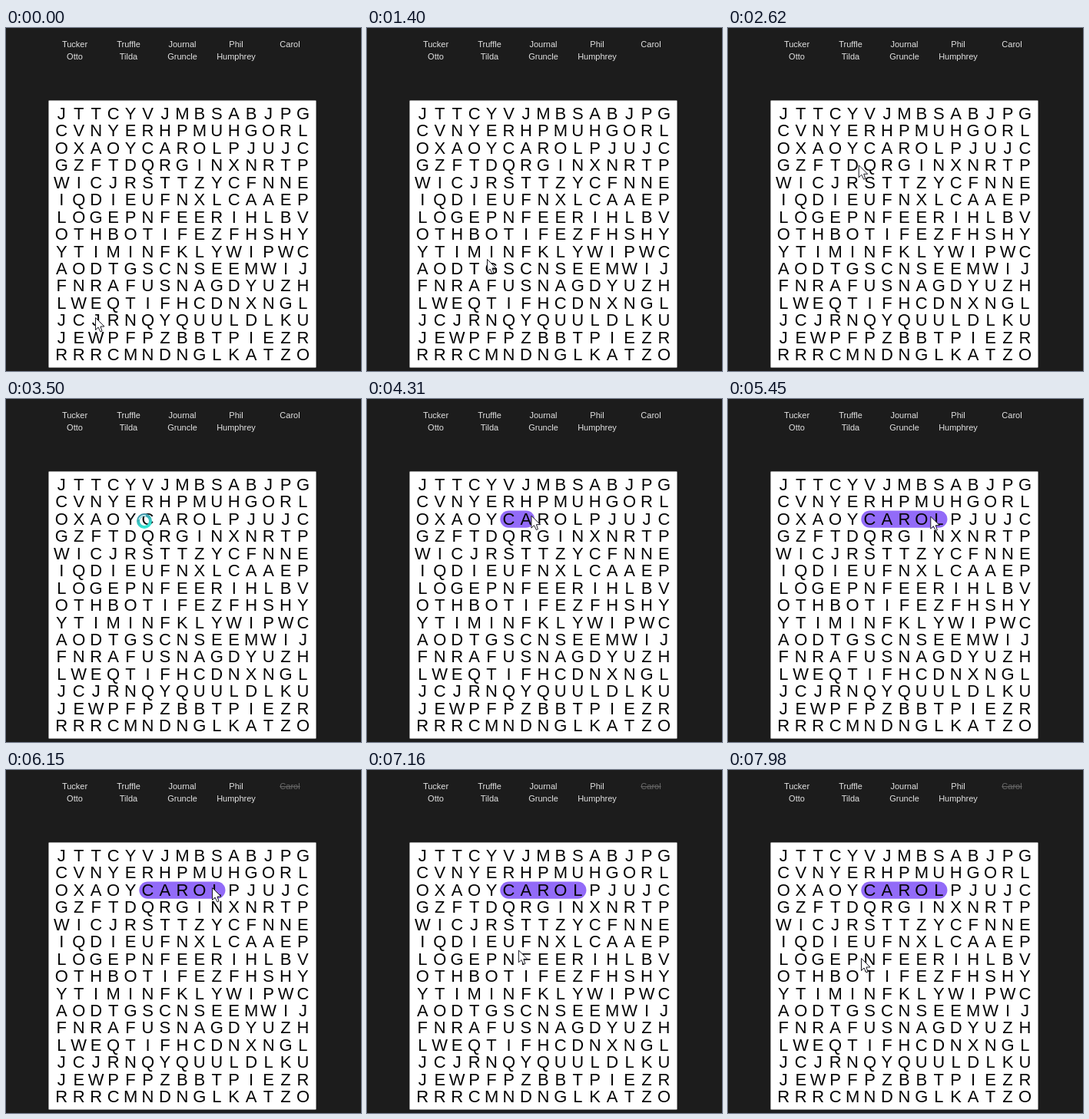
Animation, 462 px wide and 447 px high, one loop 8 s. Source, as an HTML page:

```html
<!DOCTYPE html>
<html lang="en">
<head>
<meta charset="utf-8">
<title>Word search</title>
<style>
  html, body { margin: 0; width: 100%; height: 100%; overflow: hidden; background: #1c1c1c; }
  svg { display: block; width: 462px; height: 447px; }
  text { font-family: "Liberation Sans", Arial, sans-serif; text-anchor: middle; }
  #words { font-size: 11px; fill: #e2e2e2; }
  #words .found { fill: #686868; text-decoration: line-through; }
  #letters { font-size: 22px; fill: #050505; }
</style>
</head>
<body>
<svg viewBox="0 0 462 447">
  <defs>
    <linearGradient id="teal" x1="0" y1="0" x2="0.3" y2="1">
      <stop offset="0" stop-color="#3f8fa6"/>
      <stop offset="1" stop-color="#35e3d2"/>
    </linearGradient>
  </defs>
  <g id="words"></g>
  <rect x="55.5" y="94.5" width="348" height="348" rx="1" fill="#fff" stroke="#999"/>
  <rect id="pill" fill="#926bf8"/>
  <g id="letters"></g>
  <g id="ring" fill="none">
    <circle cx="180" cy="159" r="8" stroke="url(#teal)" stroke-width="4"/>
    <path d="M173 157a7.5 7.5 0 0 1 9-5" stroke="#d5f4f5" stroke-width="1.5"/>
  </g>
  <path id="arrow" d="M.5 .5V16.5L4 13L7 19L9 18L7 12H12Z"
        fill="#fff" stroke="#181820" stroke-linejoin="round"/>
</svg>
<script>
const LOOP = 8000, CELL = 22.44, X0 = 72.3, Y0 = 111.7, R = 11.2;
const FIRST = 5, LAST = 9, ROW = 2; // cells of the found word
const $ = id => document.getElementById(id);

const words = [
  ["Tucker", "Truffle", "Journal", "Phil", "Carol"],
  ["Otto", "Tilda", "Gruncle", "Humphrey"]
];
const grid = `JTTCYVJMBSABJPG CVNYERHPMUHGORL OXAOYCAROLPJUJC
  GZFTDQRGINXNRTP WICJRSTTZYCFNNE IQDIEUFNXLCAAEP
  LOGEPNFEERIHLBV OTHBOTIFEZFHSHY YTIMINFKLYWIPWC
  AODTGSCNSEEMWIJ FNRAFUSNAGDYUZH LWEQTIFHCDNXNGL
  JCJRNQYQUULDLKU JEWPFPZBBTPIEZR RRRCMNDNGLKATZO`.split(/\s+/);

// Pointer moves: start, end, x, y
const moves = [
  [680, 1400, 156, 301],
  [1740, 2310, 162, 207],
  [2440, 3130, 179, 159],
  [3890, 3950, 180, 157],
  [4030, 4940, 244, 149],
  [5000, 5810, 268, 153],
  [6770, 7370, 187, 238],
  [7670, 7980, 173, 245]
];

function addText(parent, x, y, s) {
  const el = document.createElementNS("http://www.w3.org/2000/svg", "text");
  set(el, { x, y });
  el.textContent = s;
  parent.append(el);
}

function set(el, attrs) {
  for (const name in attrs) el.setAttribute(name, attrs[name]);
}

function show(el, on) {
  set(el, { visibility: on ? "visible" : "hidden" });
}

words.forEach((row, r) => row.forEach((w, c) =>
  addText($("words"), 89.5 + 70 * c, 25 + 16 * r, w)));
grid.forEach((row, r) => [...row].forEach((ch, c) =>
  addText($("letters"), X0 + CELL * c, Y0 + 7.3 + CELL * r, ch)));
const foundWord = $("words").children[4];
set($("pill"), { x: X0 + FIRST * CELL - R, y: Y0 + ROW * CELL - R, height: 2 * R, rx: R });

// Both axes ease out, y sooner than x, which bends the path like a hand does
function pointer(t) {
  let x = 116, y = 377;
  for (const [from, to, toX, toY] of moves) {
    const rest = 1 - Math.min(1, Math.max(0, (t - from) / (to - from)));
    x += (toX - x) * (1 - rest ** 2);
    y += (toY - y) * (1 - rest ** 3);
  }
  return [x, y];
}

function draw(t) {
  const [x, y] = pointer(t);
  const busy = t >= 3500 && t < 3770;
  set($("arrow"), { transform: `translate(${x} ${y})` });
  show($("arrow"), !busy);
  show($("ring"), busy);

  // The selection snaps to the nearest column until the word is complete
  const end = t < 5660 ? Math.max(FIRST, Math.round((x - X0) / CELL)) : LAST;
  set($("pill"), { width: (end - FIRST) * CELL + 2 * R });
  show($("pill"), t >= 3860);
  foundWord.classList.toggle("found", t >= 6150);
}

const start = performance.now();
function tick() {
  draw((performance.now() - start) % LOOP);
  requestAnimationFrame(tick);
}
tick();
</script>
</body>
</html>
```
